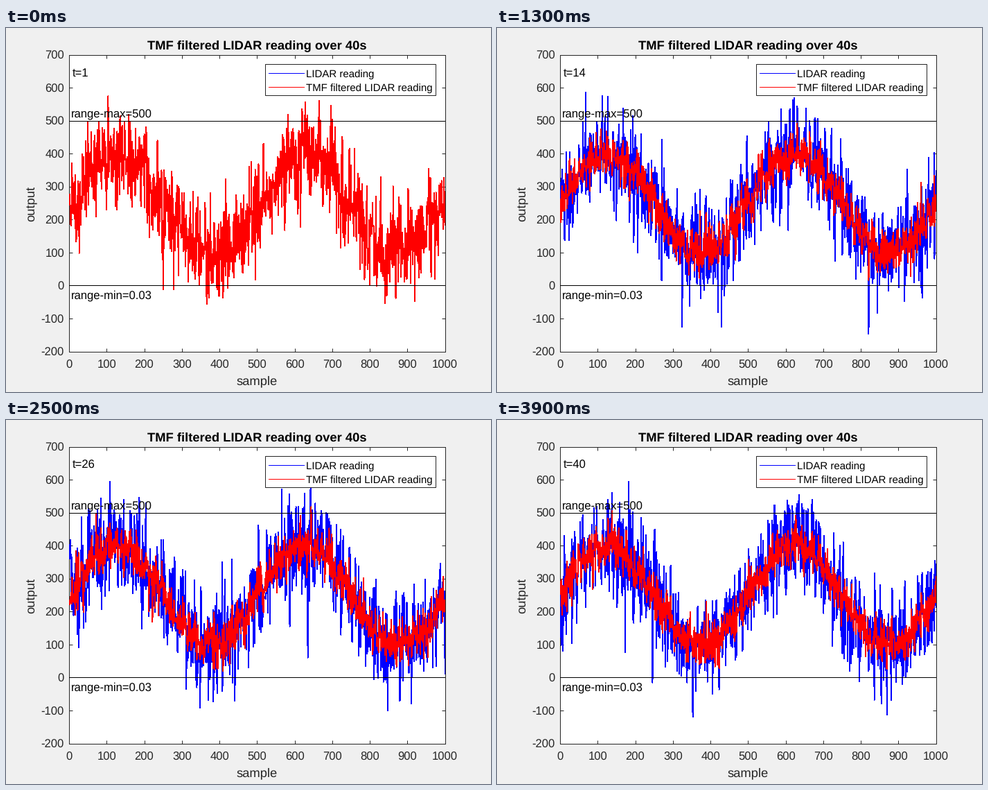
These frames come from a looping animation (700 by 525 pixels, 4 s). A matplotlib script:

```python
import matplotlib.pyplot as plt
import numpy as np
from matplotlib.animation import FuncAnimation
from matplotlib.lines import Line2D
from matplotlib.patches import Rectangle

W, H, DPI = 700, 525, 100
PT = 72 / DPI  # points per pixel
LEFT, RIGHT, TOP, BOTTOM = 91, 633.6, 38.65, 466.55  # plot box in pixels
TICK, TITLE, LEGEND = 50 / 3, 55 / 3, 15  # text sizes in pixels
DARK, BLUE, RED = "#262626", "#0000ff", "#ff0000"

SCANS, SAMPLES = 40, 1000
HISTORY = 5  # earlier scans that enter the median
NOISE = 80

plt.rcParams.update({
    "font.family": "Liberation Sans",
    "text.hinting": "none",
    "path.simplify": False,
})

rng = np.random.default_rng(7)
sample = np.arange(1, SAMPLES + 1)
wave = 250 + 150 * np.sin(2 * np.pi * sample / 500)
readings = wave + rng.normal(0, NOISE, (SCANS, SAMPLES))
filtered = [np.median(readings[max(0, i - HISTORY):i + 1], axis=0)
            for i in range(SCANS)]

fig = plt.figure(figsize=(W / DPI, H / DPI), dpi=DPI, facecolor="#f0f0f0")
ax = fig.add_axes([LEFT / W, 1 - BOTTOM / H,
                   (RIGHT - LEFT) / W, (BOTTOM - TOP) / H])
ax.set(xlim=(0, 1000), ylim=(-200, 700),
       xticks=range(0, 1001, 100), yticks=range(-200, 701, 100))
ax.tick_params(direction="in", top=True, right=True, length=5.4 * PT,
               width=PT, color=DARK, labelbottom=False, labelleft=False)
for spine in ax.spines.values():
    spine.set(color=DARK, linewidth=PT, zorder=1)


def label(x, y, text, size, color="black", ha="left", **kw):
    """Text with its baseline at pixel (x, y), y counted from the top."""
    return fig.text(x / W, 1 - y / H, text, fontsize=size * PT, color=color,
                    ha=ha, va="baseline", rotation_mode="anchor", **kw)


def legend_entry(y, color, text):
    fig.add_artist(Line2D([379 / W, 430 / W], [1 - y / H] * 2,
                          color=color, linewidth=PT))
    label(433, y + 6, text, LEGEND)


def trace(color, zorder):
    line, = ax.plot([], [], color=color, linewidth=PT,
                    antialiased=False, zorder=zorder)
    return line


for i in range(11):
    label(LEFT + (RIGHT - LEFT) * i / 10, 491, f"{100 * i}",
          TICK, DARK, "center")
for i in range(10):
    label(84, BOTTOM + 6.5 - (BOTTOM - TOP) * i / 9, f"{100 * i - 200}",
          TICK, DARK, "right")

center = (LEFT + RIGHT) / 2
label(center, 30, "TMF filtered LIDAR reading over 40s", TITLE,
      ha="center", weight="bold")
label(center, 514, "sample", TITLE, DARK, "center")
label(41, 253, "output", TITLE, DARK, "center", rotation=90)

blue, red = trace(BLUE, 2), trace(RED, 3)
for limit in (0.03, 500):
    ax.axhline(limit, color="black", linewidth=PT, zorder=4)
label(94, 129, "range-max=500", TICK)
label(94, 390, "range-min=0.03", TICK)
clock = label(96, 70, "", TICK)

fig.add_artist(Rectangle((374 / W, 1 - 97 / H), 246 / W, 45 / H,
                         facecolor="white", edgecolor=DARK, linewidth=PT))
legend_entry(65, BLUE, "LIDAR reading")
legend_entry(85, RED, "TMF filtered LIDAR reading")


def update(i):
    blue.set_data(sample, readings[i])
    red.set_data(sample, filtered[i])
    clock.set_text(f"t={i + 1}")
    return blue, red, clock


anim = FuncAnimation(fig, update, frames=SCANS, interval=100, repeat=True)
plt.show()
```
